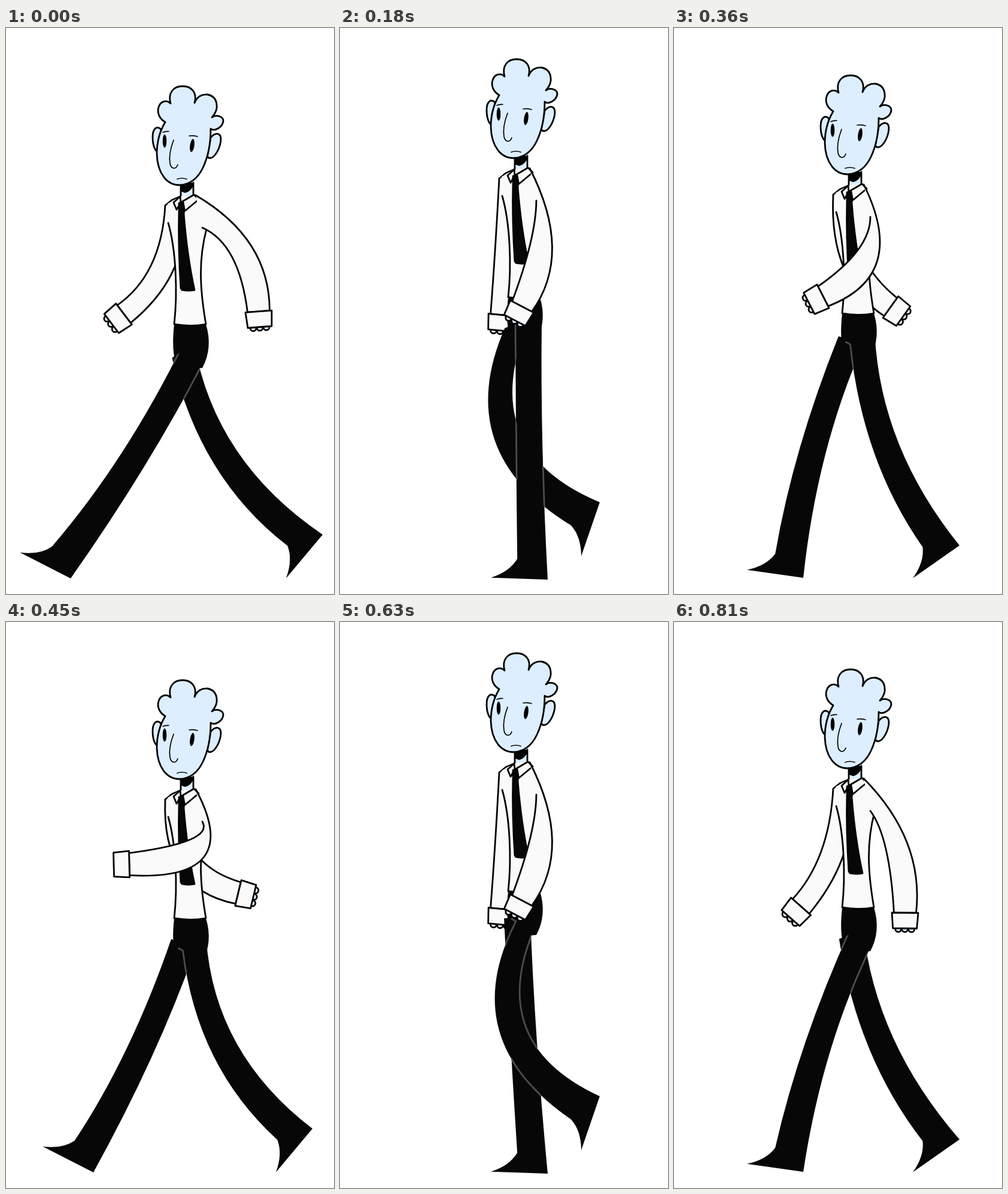
These frames come from a looping animation (548x944 px, 900 ms). An HTML page with a canvas:

```html
<!DOCTYPE html>
<html lang="en">
<head>
<meta charset="utf-8">
<title>Walk cycle</title>
<style>
html, body { margin: 0; width: 100%; height: 100%; overflow: hidden; background: #fff; }
canvas { display: block; width: 548px; height: 944px; }
</style>
</head>
<body>
<canvas width="548" height="944"></canvas>
<script>
const STEP = 90, POSES = 10, HALF = POSES / 2;
const SHIRT = '#fafafa', SKIN = '#ddeeff', INK = '#070707', SEAM = '#4c4c4c';
const LINE = 2.8;
const ctx = document.querySelector('canvas').getContext('2d');
ctx.lineCap = ctx.lineJoin = 'round';

// One stride of a leg, starting at heel strike.
const STRIDE = {
  near: [108, 253, 347, 467, 477, 512, 467, 434, 313, 216],
  far: [146, 216, 347, 467, 477, 529, 462, 434, 313, 216],
  y: [918, 919, 920, 872, 863, 845, 812, 791, 916, 917],
  tilt: [27, 10, 2, -27, -35, -50, -62, -71, 0, 8],
  bend: [10, 0, -2, -30, -27, -37, -55, -79, -31, -13]
};
const BOB = [0, -24, -45, -24, -18];
const HANDS = {
  near: [422, 370, 304, 282, 249, 206, 249, 304, 340, 386],
  far: [197, 220, 270, 351, 362, 388, 366, 270, 247, 212]
};

const pt = (x, y) => ({ x, y });
const move = (p, dir, k) => pt(p.x + dir.x * k, p.y + dir.y * k);
const middle = (a, b) => pt((a.x + b.x) / 2, (a.y + b.y) / 2);
const turn = v => pt(v.y, -v.x);
function toward(a, b) {
  const len = Math.hypot(b.x - a.x, b.y - a.y);
  return pt((b.x - a.x) / len, (b.y - a.y) / len);
}

// Control point of the arc that passes through "via" halfway from a to b.
const pull = (a, via, b) => move(via, pt(via.x - (a.x + b.x) / 2, via.y - (a.y + b.y) / 2), 1);

function bow(path, a, via, b) {
  const c = pull(a, via, b);
  path.quadraticCurveTo(c.x, c.y, b.x, b.y);
}

function paint(path, fill, stroke = '#000', width = LINE) {
  if (fill) {
    ctx.fillStyle = fill;
    ctx.fill(path);
  }
  if (stroke) {
    ctx.strokeStyle = stroke;
    ctx.lineWidth = width;
    ctx.stroke(path);
  }
}
const draw = (d, ...style) => paint(new Path2D(d), ...style);

function oval(x, y, rx, ry, tilt = 0) {
  const p = new Path2D();
  p.ellipse(x, y, rx, ry, tilt, 0, 2 * Math.PI);
  return p;
}

function leg(hip, x, phase) {
  const a = STRIDE.tilt[phase] * Math.PI / 180;
  const heel = pt(x, STRIDE.y[phase]);
  const sole = pt(-Math.cos(a), -Math.sin(a)), up = pt(Math.sin(a), -Math.cos(a));
  const foot = (along, high) => move(move(heel, sole, along), up, high);
  const instep = foot(52, 33), arch = foot(64, 11), toe = foot(95, 0);

  const ankle = middle(heel, instep);
  const side = turn(toward(hip, ankle));
  const knee = move(middle(hip, ankle), side, STRIDE.bend[phase]);
  const front = [move(hip, side, -22), move(knee, side, -22), instep];
  const back = [move(hip, side, 22), move(knee, side, 22), heel];

  const shape = new Path2D(), edges = new Path2D();
  shape.moveTo(front[0].x, front[0].y);
  bow(shape, ...front);
  shape.quadraticCurveTo(arch.x, arch.y, toe.x, toe.y);
  shape.lineTo(heel.x, heel.y);
  bow(shape, heel, back[1], back[0]);
  shape.closePath();

  edges.moveTo(front[0].x - 7, front[0].y - 4);
  edges.lineTo(front[0].x, front[0].y);
  bow(edges, ...front);
  edges.moveTo(back[0].x, back[0].y);
  bow(edges, ...back);
  return { shape, edges };
}

function legs(i, bob) {
  const j = (i + HALF) % POSES;
  const far = leg(pt(296, 538 + bob), STRIDE.far[j], j);
  const near = leg(pt(315, 538 + bob), STRIDE.near[i], i);
  paint(far.shape, INK, null);
  paint(near.shape, INK, null);
  // The near leg shows a seam only where it crosses the far one.
  ctx.save();
  ctx.clip(far.shape);
  paint(near.edges, null, SEAM);
  ctx.restore();
}

// starts: beginnings of the left and right sleeve edges.
function arm(shoulder, elbow, wrist, starts, showHand) {
  const side = turn(toward(shoulder, wrist));
  const dir = toward(pull(shoulder, elbow, wrist), wrist);
  const across = turn(dir);
  const at = (along, out) => move(move(wrist, dir, along), across, out);
  const [left, right] = starts;

  if (showHand) for (const k of [-11, 0, 11]) {
    const c = at(27, k);
    paint(oval(c.x, c.y, 5, 5), SKIN);
  }
  const sleeve = new Path2D();
  sleeve.moveTo(left.x, left.y);
  bow(sleeve, left, move(elbow, side, -18.5), at(0, -18.5));
  const end = at(0, 18.5);
  sleeve.lineTo(end.x, end.y);
  bow(sleeve, end, move(elbow, side, 18.5), right);
  paint(sleeve, SHIRT);

  const cuff = new Path2D();
  for (const [along, out] of [[0, -22], [0, 22], [26, 20], [26, -20]]) {
    const c = at(along, out);
    cuff.lineTo(c.x, c.y);
  }
  cuff.closePath();
  paint(cuff, SHIRT);
}

function nearArm(x) {
  const s = (x - 310) / 108;
  arm(pt(326, 306),
    pt(338 + 36 * s + 17 * s * s, 408 - 33 * s * s),
    pt(x, 512 + 40 * s - 75 * s * s),
    [pt(328, 333), pt(317, 279)], s > -0.9);
}

function farArm(x) {
  const s = (x - 292) / 96;
  draw('M291 281L277 287 266 296');
  arm(pt(280, 308),
    pt(283 + 24 * s, 418 - 15 * s * s),
    pt(x, 524 - 12 * s - 60 * s * s),
    [pt(266, 296), pt(296, 320)], true);
}

function head() {
  draw('M292 255H313V279L299 288 292 288Z', SKIN, null);
  draw('M292 260V290M313 258V278');
  draw('M291 258H314C313 267 306 274 299 275L291 272Z', '#000', null);
  draw('M259 169C252 162 245 168 245 182 245 196 249 205 254 207Z', SKIN);
  draw('M342 183C349 174 358 174 359 184 359 198 350 216 341 217 337 217 336 214 337 210Z', SKIN);
  draw('M266 157C256 151 252 141 255 132 258 122 268 119 275 126 270 108 280 97 295 97'
    + ' 310 97 320 108 315 125 319 114 328 110 337 111 353 114 358 134 344 149'
    + ' 351 144 363 147 363 155 362 166 348 173 342 168 342 192 338 214 329 233'
    + ' 320 252 306 261 290 262 269 262 253 243 252 210 252 190 257 172 266 157Z', SKIN);
  paint(oval(265, 188.5, 3.3, 11), '#000', null);
  paint(oval(311, 196, 3.6, 11, 0.14), '#000', null);
  draw('M262 174Q267 172 272 172.5M306 180Q313 179 320 181'
    + 'M280 187C275 200 272 214 274 226 276 236 284 236 287 228M286 252Q294 249 302 252', null, '#000', 1.7);
}

function torso() {
  draw('M291 281L316 278 336 334C324 380 323 430 334 494Q308 498 281 494C287 440 284 370 271 325L270 293Z', SHIRT, null);
  draw('M271 325C284 370 287 440 281 494Q308 499 334 494C323 430 322 385 335 335');
  draw('M291 281L280 291 285 303 292 291ZM314 278L322 286 299 305 292 291Z', SHIRT);
  draw('M289 292L296 291 298 302 297 310C301 360 308 405 315 437Q303 439 294 437L292 434C289 390 288 345 289 304Z', INK);
}

function atBody(bob, ...parts) {
  ctx.save();
  ctx.translate(0, bob);
  for (const part of parts) part();
  ctx.restore();
}

function drawPose(i) {
  const bob = BOB[i % HALF];
  ctx.fillStyle = '#fff';
  ctx.fillRect(0, 0, 548, 944);
  atBody(bob,
    () => farArm(HANDS.far[i]),
    () => draw('M281 494H334C342 520 340 545 328 567L286 570C278 545 278 520 281 494Z', INK, null));
  legs(i, bob);
  atBody(bob, head, torso, () => nearArm(HANDS.near[i]));
}

const start = performance.now();
let shown = -1;

function tick() {
  const i = Math.floor((performance.now() - start) / STEP) % POSES;
  if (i !== shown) drawPose(shown = i);
  requestAnimationFrame(tick);
}
tick();
</script>
</body>
</html>
```
